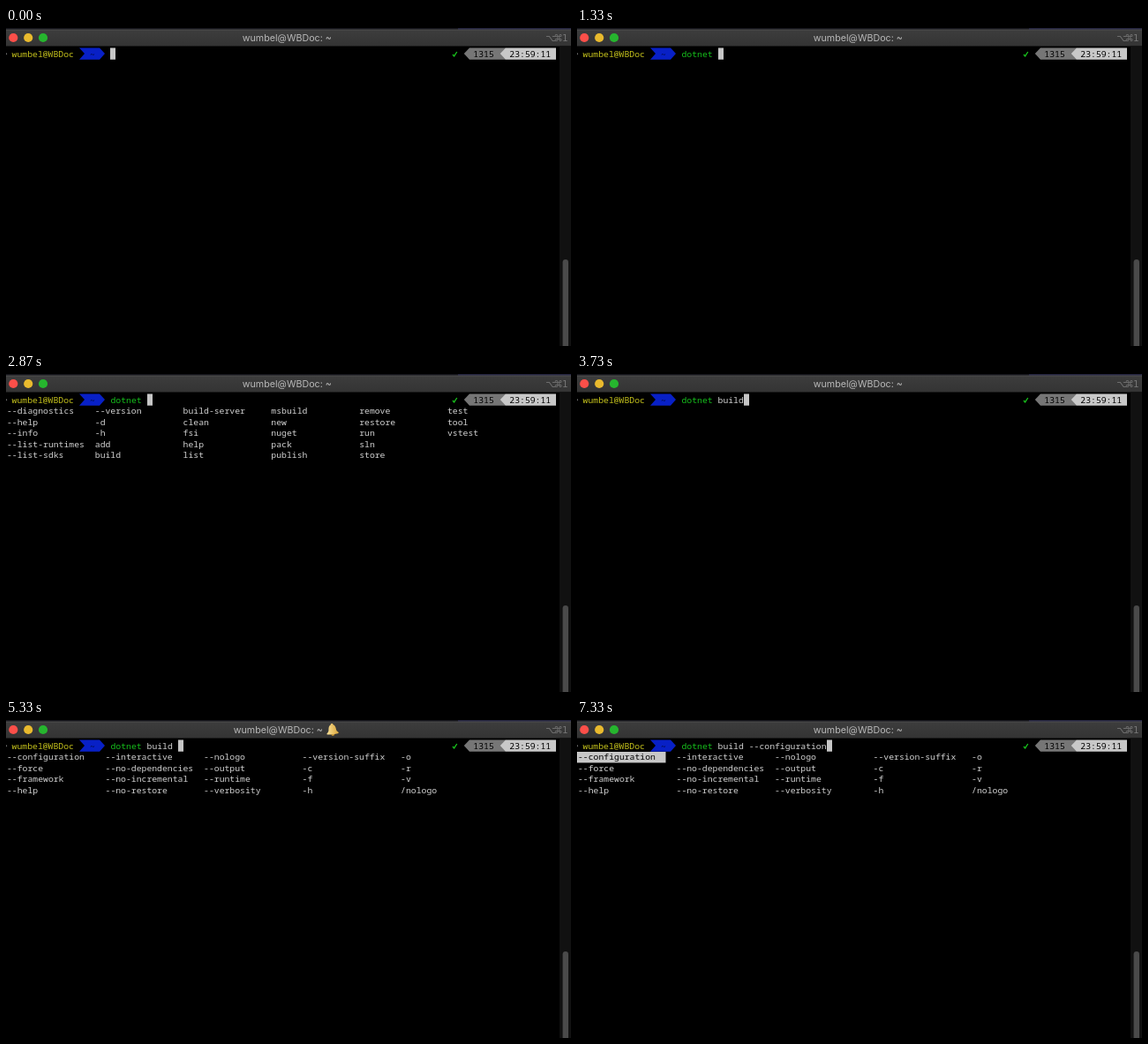
These frames come from a looping animation (640x360 px, 8 s). An HTML page:

```html
<!DOCTYPE html>
<html lang="en">
<head>
<meta charset="utf-8">
<title>Terminal completion</title>
<style>
html, body { margin: 0; width: 100%; height: 100%; overflow: hidden; background: #000; }
svg { display: block; width: 640px; height: 360px; }
text { white-space: pre; }
.mono { font: 500 9.78px "Noto Sans Mono", "DejaVu Sans Mono", monospace; font-variant-ligatures: none; fill: #d2d2d2; }
.title { font: 10.7px Inter, "Liberation Sans", sans-serif; fill: #b8b8b8; text-anchor: middle; }
.keys { font: 10.5px "DejaVu Sans", sans-serif; fill: #747474; }
</style>
</head>
<body>
<svg id="stage" viewBox="0 0 640 360">
  <defs>
    <linearGradient id="bar" x2="0" y2="1">
      <stop offset="0" stop-color="#3d3d3d"/><stop offset="1" stop-color="#343434"/>
    </linearGradient>
    <linearGradient id="gold">
      <stop offset="0" stop-color="#fbe39a"/><stop offset="1" stop-color="#d9a63c"/>
    </linearGradient>
  </defs>
  <rect width="640" height="360"/>

  <rect width="640" height="2" fill="#15151b"/>
  <rect x="512" width="128" height="2" fill="#25253f"/>
  <rect y="2" width="640" height="18.5" fill="url(#bar)"/>
  <rect y="1.6" width="640" height=".8" fill="#555"/>
  <circle cx="8.3" cy="11" r="5.1" fill="#fc4f49"/>
  <circle cx="25.2" cy="11" r="5.1" fill="#e9ba2e"/>
  <circle cx="42" cy="11" r="5.1" fill="#26b52e"/>
  <text id="title" class="title" y="15">wumbel@WBDoc: ~</text>
  <g id="bell" transform="translate(369.7 11) rotate(-6) scale(1.08)">
    <circle cy="5" r="1.6" fill="#b98a30"/>
    <path d="M0-6.5C1-6.5 1.3-6 1.3-5.2C3.4-4.4 3.8-2 4 0.4C4.2 2.2 6.3 3 6.3 4C6.3 5.3-6.3 5.3-6.3 4C-6.3 3-4.2 2.2-4 0.4C-3.8-2-3.4-4.4-1.3-5.2C-1.3-6-1-6.5 0-6.5Z" fill="url(#gold)"/>
  </g>
  <text class="keys" x="611 620.5 630" y="15">⌥⌘1</text>

  <path d="M0 28l1.4 1.3L0 30.6Z" fill="#777"/>
  <text class="mono" x="6.6" y="32.9" style="fill:#c6c31c">wumbel@WBDoc</text>
  <path d="M83 22.5H106L112 29.1L106 35.7H83L89 29.1Z" fill="#0820c6"/>
  <text class="mono" x="95" y="32.9" style="fill:#000b3c">~</text>
  <path d="M506 30L507.6 31.9L510.8 27" fill="none" stroke="#18c31c" stroke-width="1.3"/>
  <path d="M518.8 29.1L525 22.5H566V35.7H525Z" fill="#767676"/>
  <path d="M559.8 29.1L566 22.5H623V35.7H566Z" fill="#c8c8c8"/>
  <text class="mono" x="529.3" y="32.9" style="fill:#000">1315</text>
  <text class="mono" x="570.3" y="32.9" style="fill:#000">23:59:11</text>

  <rect id="mark" y="36" width="100.5" height="12.4" fill="#c7c7c7"/>
  <g id="lists"></g>
  <text id="cmd" class="mono" y="32.9"></text>
  <text id="args" class="mono" y="32.9"></text>
  <rect id="line" x="118" y="34.6" height=".9" fill="#c4c4c4"/>
  <rect id="cursor" y="22.5" width="6" height="13.2" fill="#c6c6c6"/>

  <rect x="627" y="20.5" width="13" height="339.5" fill="#111"/>
  <rect x="630.6" y="262" width="6.4" height="110" rx="3.2" fill="#4a4a4a"/>
</svg>
<script>
const LOOP = 8000, CHAR = 5.87, ROW = 12.5, PROMPT = 118.45;
const el = id => document.getElementById(id);
const show = (node, on) => node.setAttribute("visibility", on ? "visible" : "hidden");

// One string per column; `pitch` is the column width in characters.
const LISTS = {
  commands: { pitch: 17, cols: [
    "--diagnostics --help --info --list-runtimes --list-sdks",
    "--version -d -h add build",
    "build-server clean fsi help list",
    "msbuild new nuget pack publish",
    "remove restore run sln store",
    "test tool vstest"] },
  options: { pitch: 19, cols: [
    "--configuration --force --framework --help",
    "--interactive --no-dependencies --no-incremental --no-restore",
    "--nologo --output --runtime --verbosity",
    "--version-suffix -c -f -h",
    "-o -r -v /nologo"] }
};

// [start ms, typed text, open list, bell in title, first entry selected]
const STEPS = [
  [0, ""],
  [130, "d"],
  [270, "do"],
  [470, "dot"],
  [800, "dotn"],
  [870, "dotne"],
  [1000, "dotnet"],
  [1200, "dotnet "],
  [1670, "dotnet ", "commands", true],
  [2800, "dotnet ", "commands"],
  [2930, "dotnet b", "commands"],
  [3070, "dotnet bu", "commands"],
  [3200, "dotnet bui", "commands"],
  [3730, "dotnet build"],
  [4800, "dotnet build "],
  [5270, "dotnet build ", "options", true],
  [6800, "dotnet build ", "options"],
  [7000, "dotnet build --configuration", "options", false, true]
];

const svgNode = (name, parent) =>
  parent.appendChild(document.createElementNS("http://www.w3.org/2000/svg", name));

for (const list of Object.values(LISTS)) {
  list.node = svgNode("g", el("lists"));
  list.cols.forEach((col, c) => col.split(" ").forEach((word, r) => {
    const text = svgNode("text", list.node);
    text.setAttribute("class", "mono");
    text.setAttribute("x", 1 + c * list.pitch * CHAR);
    text.setAttribute("y", 45.3 + r * ROW);
    text.textContent = word;
  }));
}
const firstOption = LISTS.options.node.firstChild;

function draw([, typed, list, bell, selected]) {
  const cmd = typed.slice(0, 6), known = cmd === "dotnet";
  el("cmd").textContent = cmd;
  el("cmd").setAttribute("x", PROMPT);
  el("cmd").style.fill = known ? "#16c01c" : "#d2d2d2";
  el("args").textContent = typed.slice(7);
  el("args").setAttribute("x", PROMPT + 7 * CHAR);
  el("line").setAttribute("width", known ? 0 : cmd.length * CHAR);
  el("cursor").setAttribute("x", Math.round(PROMPT + typed.length * CHAR));
  for (const key in LISTS) show(LISTS[key].node, key === list);
  el("title").setAttribute("x", bell ? 308.3 : 318.3);
  show(el("bell"), bell);
  show(el("mark"), selected);
  firstOption.style.fill = selected ? "#000" : "";
}

let current;
function tick() {
  const t = performance.now() % LOOP;
  const step = STEPS.findLast(s => s[0] <= t);
  if (step !== current) draw(current = step);
  requestAnimationFrame(tick);
}
tick();
</script>
</body>
</html>
```
